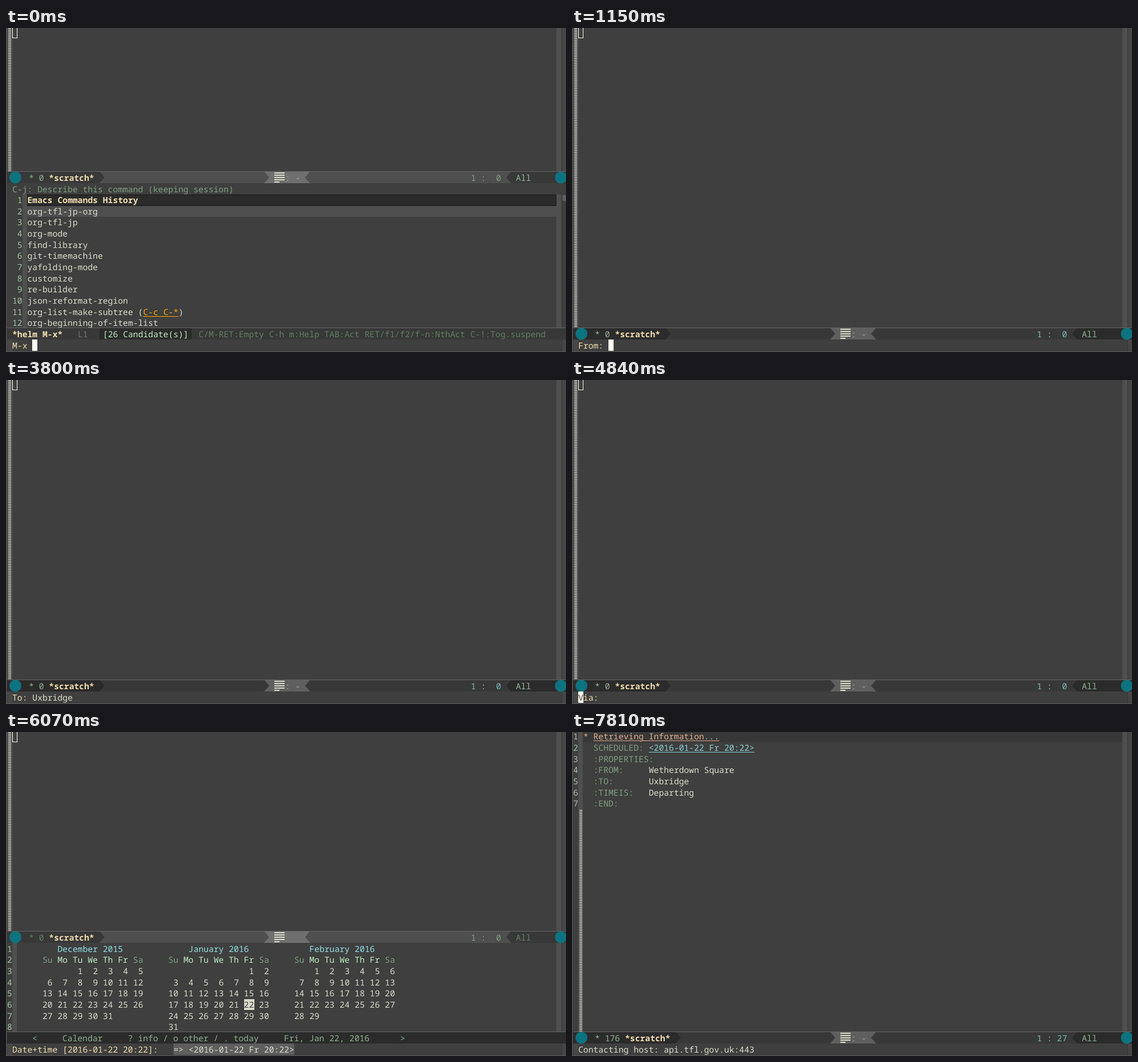
Recreate the animation shown at these times as an HTML page. Size 983 by 570 pixels, loop 8000 ms.

```html
<!DOCTYPE html>
<html lang="en">
<head>
<meta charset="utf-8">
<title>Editor session</title>
<style>
  html, body { margin: 0; width: 100%; height: 100%; overflow: hidden; background: #3f3f3f; }
  svg { display: block; width: 983px; height: 570px; }
  text {
    font: 14.73px "Noto Sans Mono", "DejaVu Sans Mono", monospace;
    white-space: pre;
    text-rendering: geometricPrecision;
  }
  .b { font-weight: 700; }
</style>
</head>
<body>
<svg id="stage" viewBox="0 0 983 570" xmlns="http://www.w3.org/2000/svg">
  <defs>
    <pattern id="dots" width="5" height="2.946" patternUnits="userSpaceOnUse">
      <rect width="5" height="1.4" fill="#d4d4c8"/>
    </pattern>
  </defs>
</svg>
<script>
(() => {
const CW = 8.84, RH = 19.65, LOOP = 8000;
const C = {
  bg: '#3f3f3f', fg: '#dcdccc', dark: '#2b2b2b', dim: '#383838', fringe: '#4f4f4f', mid: '#5f5f5f',
  yellow: '#f0dfaf', green: '#7f9f7f', low: '#5f7f5f', pale: '#8fb28f', num: '#9fc59f', mint: '#bfebbf',
  cyan: '#93e0e3', blue: '#8cd0d3', teal: '#7cb8bb', orange: '#dfaf8f', key: '#ffa500',
  cursor: '#ffffef', gem: '#0d7380'
};

const esc = s => s.replace(/&/g, '&amp;').replace(/</g, '&lt;');
const rect = (x, y, w, h, fill) => `<rect x="${x}" y="${y}" width="${w}" height="${h}" fill="${fill}"/>`;
const poly = (pts, fill) => `<polygon points="${pts}" fill="${fill}"/>`;
const rowTop = row => Math.round(row * RH - 1.7);
const text = (x, row, s, fill, cls = '') =>
  `<text x="${x.toFixed(2)}" y="${(13.4 + row * RH).toFixed(2)}" fill="${fill}" class="${cls}">${esc(s)}</text>`;
const under = (x, row, s, fill) =>
  text(x, row, s, fill) + rect(x.toFixed(1), rowTop(row) + 17, (s.length * CW).toFixed(1), 1, fill);

// Window frame: fringes, scroll bar, edges
const frame = () =>
  rect(0, 0, 983, 570, C.bg) +
  rect(966, 0, 9, 548, C.fringe) + rect(975, 0, 1, 570, '#353535') + rect(976, 0, 7, 570, '#464646') +
  rect(0, 0, 1, 570, '#5a5a5a') + rect(0, 569, 983, 1, '#5a5a5a');

const scratch = bottom =>
  rect(2, 0, 9, bottom, C.fringe) +
  `<rect width="5" height="${bottom}" fill="url(#dots)" transform="translate(4 0)"/>` +
  `<rect x="11.5" y="-1.5" width="8" height="19" fill="none" stroke="${C.cursor}"/>`;

const looks = {
  active: { bar: C.dim, panel: C.dark, hub: C.mid, info: C.pale, pos: C.teal, end: C.pale },
  helm: { bar: C.fringe, panel: C.dim, hub: '#6f6f6f', info: C.pale, pos: C.green, end: C.pale },
  idle: { bar: C.fringe, panel: C.dim, hub: '#6f6f6f', info: C.low, pos: C.green, end: C.low }
};

function modeLine(row, look, size = '0', col = ' 0') {
  const k = looks[look], y = rowTop(row) - 2, m = y + 11, b = y + 21;
  const e = Math.round(155 + (size.length - 1) * CW) + 9;
  let s = rect(2, y, 981, 21, k.bar) +
    poly(`2,${y} ${e},${y} ${e + 9},${m} ${e},${b} 2,${b}`, k.panel) +
    poly(`453,${y} 534,${y} 525,${m} 534,${b} 453,${b} 462,${m}`, k.hub) +
    poly(`887,${y} 983,${y} 983,${b} 887,${b} 878,${m}`, k.panel) +
    rect(2, y, 981, 1, '#646464');
  s += `<circle cx="16.5" cy="${m}" r="10.5" fill="${C.gem}"/><circle cx="974" cy="${m}" r="10.5" fill="${C.gem}"/>`;
  for (let i = 0; i < 5; i++) s += rect(471, y + 2 + i * 4, i < 4 ? 18 : 9, 2, C.fg);
  return s + text(40, row, '* ' + size, k.info) +
    text(40 + (size.length + 3) * CW, row, '*scratch*', C.yellow, 'b') +
    text(490, row, ': -', k.info) +
    text(816, row, '1 : ' + col, k.pos) + text(895, row, 'All', k.end);
}

// Echo area with an optional block cursor at column cur
function mini(prompt, input = '', cur = -1) {
  let s = rect(2, 548, 9, 21, '#474747') + text(11, 28, prompt, C.yellow) +
    text(11 + prompt.length * CW, 28, input, C.fg);
  if (cur >= 0) {
    const x = 11 + cur * CW, ch = (prompt + input)[cur] || ' ';
    s += rect(Math.round(x), 548, 9, 20, C.cursor) + text(x, 28, ch, C.bg);
  }
  return s;
}

const commands = ['org-tfl-jp-org', 'org-tfl-jp', 'org-mode', 'find-library', 'git-timemachine',
  'yafolding-mode', 'customize', 're-builder', 'json-reformat-region',
  'org-list-make-subtree (', 'org-beginning-of-item-list'];

function helm() {
  const x = 37.5;
  let s = frame() + scratch(252) + rect(2, 273, 981, 20, C.bg) +
    text(11, 14, 'C-j: Describe this command (keeping session)', C.green) +
    rect(29, 293, 8, 234, C.fringe) + rect(966, 293, 9, 234, C.fringe) +
    rect(976, 293, 7, 234, C.bg) + rect(977, 294, 6, 10, C.mid) +
    rect(37, 293, 929, 20, '#161616') + rect(38, 294, 927, 18, C.dark) +
    rect(37, 313, 929, 19, C.fringe) +
    text(x, 15, 'Emacs Commands History', C.yellow, 'b');
  for (let i = 1; i <= 12; i++) s += text(11, 14 + i, String(i).padStart(2), C.num);
  commands.forEach((c, i) => s += text(x, 16 + i, c, C.fg));
  s += under(x + 23 * CW, 25, 'C-c C-*', C.key) + text(x + 30 * CW, 25, ')', C.fg);
  return s + modeLine(13, 'helm') +
    rect(2, 527, 981, 21, C.dim) + rect(164, 527, 162, 21, C.dark) + rect(2, 527, 981, 1, '#646464') +
    text(11, 27, '*helm M-x*', C.yellow, 'b') + text(11 + 13 * CW, 27, 'L1', C.low) +
    text(11 + 18 * CW, 27, '[26 Candidate(s)]', C.mint) +
    text(11 + 37 * CW, 27, 'C/M-RET:Empty C-h m:Help TAB:Act RET/f1/f2/f-n:NthAct C-!:Tog.suspend', C.low);
}

// Title, title column, first day column, first weekday, days
const months = [
  ['December 2015', 8, 5, 2, 31],
  ['January 2016', 34, 30, 5, 31],
  ['February 2016', 58, 55, 1, 29]
];

function calendar() {
  const at = col => 19.8 + col * CW;
  let s = frame() + scratch(350) + rect(2, 371, 9, 156, C.bg) + rect(11, 371, 8, 156, C.fringe);
  for (let i = 1; i <= 8; i++) s += text(2, 18 + i, String(i), C.num);
  for (const [title, tc, c0, first, days] of months) {
    s += text(at(tc), 19, title, C.cyan) + text(at(c0), 20, 'Su', C.green) +
      text(at(c0 + 3), 20, 'Mo Tu We Th Fr', C.mint) + text(at(c0 + 18), 20, 'Sa', C.green);
    for (let d = 1; d <= days; d++) {
      const n = d - 1 + first, x = at(c0 + n % 7 * 3), row = 21 + Math.floor(n / 7);
      const today = d === 22 && first === 5;
      if (today) s += rect(Math.round(x), rowTop(row), 18, 19, C.fg);
      s += text(x, row, String(d).padStart(2), today ? C.bg : C.fg);
    }
  }
  s += modeLine(18, 'idle') + rect(2, 527, 981, 21, C.dark) + rect(2, 527, 981, 1, '#646464');
  [[46, '<'], [99, 'Calendar'], [214, '? info / o other / . today'], [488, 'Fri, Jan 22, 2016'], [692, '>']]
    .forEach(([x, t]) => s += text(x, 27, t, C.pale));
  return s;
}

function entry() {
  const x = 37.5, vx = 19.8 + 13 * CW;
  let s = frame() + rect(11, 0, 8, 527, C.fringe) + rect(19, 0, 947, 18, C.dim) +
    `<rect width="5" height="390" fill="url(#dots)" transform="translate(13 137)"/>`;
  for (let i = 0; i < 7; i++) s += text(2, i, String(i + 1), C.num);
  s += text(19.8, 0, '*', C.orange) + under(x, 0, 'Retrieving Information...', C.orange) +
    under(vx, 1, '<2016-01-22 Fr 20:22>', C.blue);
  ['SCHEDULED:', ':PROPERTIES:', ':FROM:', ':TO:', ':TIMEIS:', ':END:']
    .forEach((t, i) => s += text(x, i + 1, t, C.green));
  [place, 'Uxbridge', 'Departing'].forEach((t, i) => s += text(vx, i + 3, t, C.fg));
  return s + modeLine(27, 'active', '176', '27');
}

const place = 'Wetherdown Square';
const plain = frame() + scratch(527) + modeLine(27, 'active');
const preview = rect(294, 548, 212, 20, C.mid) + text(294, 28, '=> <2016-01-22 Fr 20:22>', C.fg);
const screens = { helm: helm(), plain, cal: calendar() + preview, entry: entry() };
const date = 'Date+time [2016-01-22 20:22]: ';
const ask = 'Time is departure time? No for arrival time: (y or n) ';

// Start time, screen, prompt, input, cursor column
const steps = [
  [0, 'helm', 'M-x ', '', 4],
  [380, 'helm', 'M-x '],
  [890, 'helm', 'M-x ', '', 4],
  [1150, 'plain', 'From: ', '', 6],
  [1640, 'plain', 'From: '],
  [2100, 'plain', 'From: ', place, 6],
  [2590, 'plain', 'From: ', place],
  [2840, 'plain', 'To: ', '', 4],
  [3300, 'plain', 'To: ', 'Uxbridge', 4],
  [3800, 'plain', 'To: ', 'Uxbridge'],
  [4160, 'plain', 'To: ', 'Uxbridge', 0],
  [4200, 'plain', 'Via: ', '', 5],
  [4650, 'plain', 'Via: '],
  [4840, 'plain', 'Via: ', '', 0],
  [4880, 'cal', date, '', 30],
  [5350, 'cal', date],
  [5860, 'cal', date, '', 30],
  [6070, 'cal', date],
  [6110, 'plain', ask, '', 54],
  [7770, 'plain', ask + 'y'],
  [7810, 'entry', '', 'Contacting host: api.tfl.gov.uk:443']
];

const stage = document.getElementById('stage');
const group = html => {
  const g = document.createElementNS('http://www.w3.org/2000/svg', 'g');
  g.innerHTML = html;
  g.style.display = 'none';
  return stage.appendChild(g);
};
const views = {};
for (const name in screens) views[name] = group(screens[name]);
const lines = steps.map(([, , ...args]) => group(mini(...args)));

let shown = -1;
const start = performance.now();
function draw(now) {
  const t = Math.max(0, now - start) % LOOP;
  let i = steps.length - 1;
  while (steps[i][0] > t) i--;
  if (i !== shown) {
    for (const name in views) views[name].style.display = name === steps[i][1] ? '' : 'none';
    lines.forEach((g, n) => g.style.display = n === i ? '' : 'none');
    shown = i;
  }
  requestAnimationFrame(draw);
}
draw(start);
})();
</script>
</body>
</html>
```
